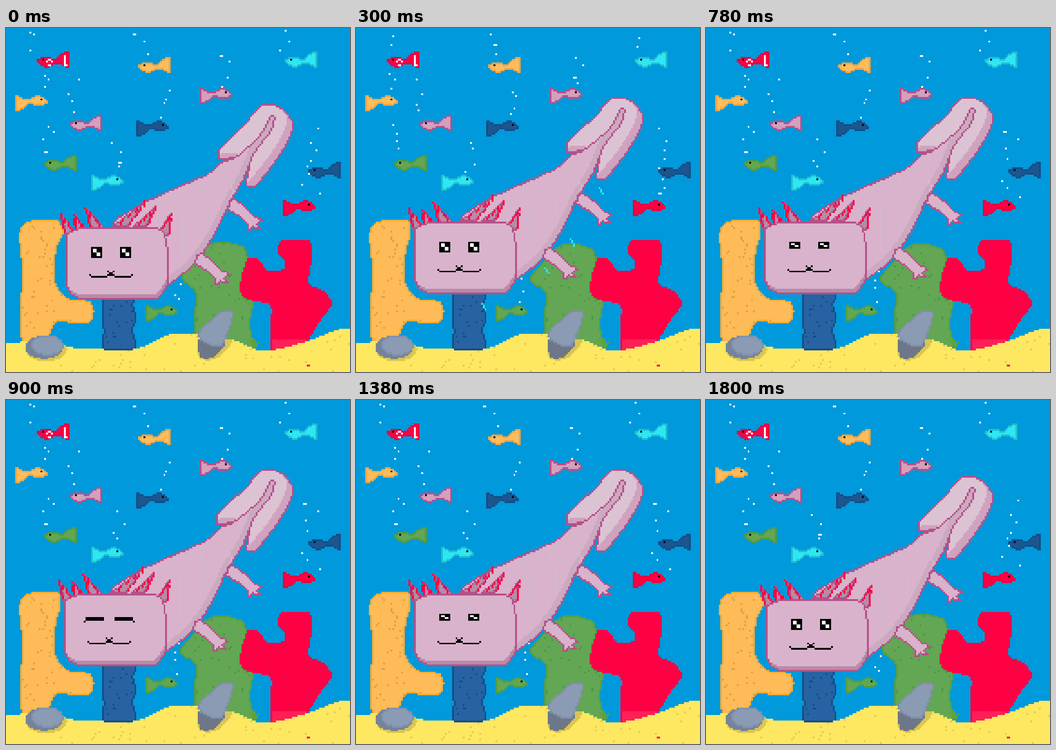
An HTML page with a canvas that plays this animation: 748 px wide and 748 px high, repeating every 2100 ms.

```html
<!DOCTYPE html>
<html lang="en">
<head>
<meta charset="utf-8">
<title>Axolotl aquarium</title>
<style>
html, body { margin: 0; width: 100%; height: 100%; overflow: hidden; background: #0099db; }
canvas { display: block; width: 748px; height: 748px; image-rendering: pixelated; }
</style>
</head>
<body>
<canvas id="tank" width="190" height="190"></canvas>
<script>
const N = 190, CELL = 748 / N, STEP = 300;
const C = {
  water: '#0099db', sand: '#fee761', grain: '#e4cb50', shade: '#dbc552',
  red: '#ff0044', cyan: '#2ce8f5', line: '#b55088', skin: '#d9b3cb',
  fin: '#dcc3d3', finDark: '#cfa3bf', belly: '#cbaac1', dark: '#b78ba7', rib: '#d4b8cd'
};

const pts = s => s.split(' ').map(p => p.split(',').map(Number));
const still = (x, y) => [x, y];
const lift = (x, y) => [x - (x < 505 ? CELL : 0), y - (x > 455 && y < 350 ? 4 : 3) * CELL];
const noise = (x, y) => {
  const v = Math.sin(x * 12.9898 + y * 78.233) * 43758.5453;
  return v - Math.floor(v);
};
const oval = (cx, cy, rx, ry) => Array.from({ length: 16 }, (_, i) => {
  const a = i * Math.PI / 8;
  return [cx + rx * Math.cos(a), cy + ry * Math.sin(a)];
});

let g;
function box(x, y, w, h, color) {
  g.fillStyle = color;
  g.fillRect(x, y, w, h);
}

// Closed spline through the points; bend 0 gives straight sides
function outline(p, bend) {
  const path = new Path2D(), at = i => p[(i + p.length) % p.length];
  path.moveTo(...p[0]);
  p.forEach((a, i) => {
    const z = at(i - 1), b = at(i + 1), c = at(i + 2);
    path.bezierCurveTo(
      a[0] + (b[0] - z[0]) * bend, a[1] + (b[1] - z[1]) * bend,
      b[0] - (c[0] - a[0]) * bend, b[1] - (c[1] - a[1]) * bend, ...b);
  });
  path.closePath();
  return path;
}

// Hard-edged shape: one-cell border, shaded rim towards `rim`, random specks
function shape(points, fill, opt = {}) {
  const { edge, move = still, bend = .1, rim, tint, speck, density = 0 } = opt;
  const p = points.map(q => move(...q).map(v => v / CELL));
  const path = outline(p, bend), mask = new Set(), key = (x, y) => y * 1000 + x;
  const range = k => [Math.min(...p.map(q => q[k])) - 2, Math.max(...p.map(q => q[k])) + 2].map(Math.round);
  const [x0, x1] = range(0), [y0, y1] = range(1);
  const each = fn => {
    for (let y = y0; y <= y1; y++) for (let x = x0; x <= x1; x++) fn(x, y);
  };
  const has = (x, y) => mask.has(key(x, y));
  g.lineWidth = 1;
  each((x, y) => {
    if (g.isPointInPath(path, x + .5, y + .5) || g.isPointInStroke(path, x + .5, y + .5)) mask.add(key(x, y));
  });
  each((x, y) => {
    if (!has(x, y)) return;
    let color = noise(x, y) < density ? speck : fill;
    if (rim && !has(x + rim[0], y + rim[1])) color = tint;
    if (edge && !(has(x - 1, y) && has(x + 1, y) && has(x, y - 1) && has(x, y + 1))) color = edge;
    box(x, y, 1, 1, color);
  });
}

function stroke(points, color, move = still) {
  const p = points.map(q => move(...q).map(v => Math.floor(v / CELL)));
  for (let i = 1; i < p.length; i++) {
    const [ax, ay] = p[i - 1], [bx, by] = p[i];
    const n = Math.max(Math.abs(bx - ax), Math.abs(by - ay), 1);
    for (let k = 0; k <= n; k++) {
      box(Math.round(ax + (bx - ax) * k / n), Math.round(ay + (by - ay) * k / n), 1, 1, color);
    }
  }
}

// Fish: cell position, ink, facing right
const FISH = [
  [17, 13, 'red'], [73, 16, 'orange'], [154, 13, 'cyan'],
  [35, 48, 'pink'], [21, 70, 'green'], [167, 74, 'navy'],
  [5, 37, 'orange', 1], [107, 33, 'pink', 1], [72, 51, 'navy', 1],
  [47, 81, 'cyan', 1], [153, 95, 'red', 1], [77, 153, 'green', 1]
];
const INK = {
  red: ['#ff0044', '#e4063f'], orange: ['#febc5c', '#efa644'], cyan: ['#2ce8f5', '#24becb'],
  pink: ['#d3a0be', '#b55088'], navy: ['#1c568f', '#124e89'], green: ['#63a653', '#519c42']
};
const FORM = pts('.5,5.5 2.5,3.7 5,3.4 8,3.9 10.5,5 13.5,2 16,.6 17.4,.5 17.4,8 14.5,7.4 12.5,6.4 10.5,6 8,7.8 5,8.2 2.5,7.3');

function fish([x, y, ink, right]) {
  const [fill, edge] = INK[ink];
  const form = FORM.map(([a, b]) => (right ? [x + 18 - a, y + 9 - b] : [x + a, y + b]).map(v => v * CELL));
  shape(form, fill, { edge });
  box(x + (right ? 14 : 3), y + (right ? 2 : 4), 1, 1, '#000');
}

function stripes() {
  for (let a = 0; a < 6; a++) {
    box(Math.round(23.5 + 1.8 * Math.cos(a * Math.PI / 3)), Math.round(18.4 + 1.8 * Math.sin(a * Math.PI / 3)), 1, 1, '#fff');
  }
  box(32, 15, 1, 6, '#fff');
  box(33, 20, 1, 1, '#fff');
}

// A loose column of bubbles over each mouth; deep fish follow the swimmer's pose
function bubbles(up, burst) {
  FISH.forEach(([x, y, , right], i) => {
    const seed = i + (burst ? 40 : up && y > 73 ? 20 : 0);
    const mouth = x + (right ? 15 : 1);
    for (let k = 0; k < 4; k++) {
      const dx = Math.round((noise(seed, k) - .5) * (burst ? 6 : 10));
      const rise = 1 + k * 5 + Math.round(noise(k, seed) * 4);
      box(mouth + dx, y - rise, noise(seed, k + 9) < .12 ? 2 : 1, 1, '#fff');
    }
  });
}

function reef(up) {
  const sway = (x, y) => up && y < 560 ? [x - 3, y + 4] : [x, y];
  const slim = (x, y) => up && x > 115 && y < 475 ? [x - 5, y] : [x, y];
  shape(pts('50,422 110,419 123,445 108,480 104,550 130,588 180,596 189,616 178,639 110,638 94,665 94,700 40,700 34,625 37,520 31,465 33,440'),
    '#febb58', { edge: '#feae34', move: slim, speck: '#e2a03c', density: .03 });

  const left = [], right = [];
  for (let y = 570; y <= 700; y += 10) {
    const wave = Math.cos((y - 575) / 55 * 2 * Math.PI);
    left.unshift([210 + (y - 570) * .02 - wave, y]);
    right.push([280 - (y - 570) * .03 + 4 * wave, y]);
  }
  shape([...right, ...left], '#2763a2', { edge: '#124e89', speck: '#124e89', density: .04 });

  shape(pts('386,535 440,474 480,467 516,478 526,510 520,560 537,598 529,645 534,696 420,700 410,650 414,600 412,570 389,552'),
    '#63a653', { edge: '#559f45', move: sway, speck: '#519548', density: .025 });
  shape(pts('598,465 630,462 660,463 662,510 657,556 690,574 707,600 680,637 650,688 620,701 578,701 578,604 545,593 513,580 513,540 527,503 546,502 570,530 607,525 606,504 593,488'),
    C.red, { speck: '#e2103f', density: .015 });
  shape(pts('580,680 653,680 644,703 580,703'), '#ff1f58', { bend: 0 });
}

function seabed() {
  shape(pts('-10,694 45,684 110,685 130,694 170,699 275,701 320,685 350,670 420,667 495,681 545,701 580,702 660,682 700,666 748,656 760,760 -10,760'),
    C.sand, { speck: C.grain, density: .016 });
  shape(oval(88, 700, 42, 23), C.shade);
  shape(oval(83, 694, 39, 23), '#75839a');
  shape(oval(90, 690, 33, 20), '#8b9bb4', { edge: '#8292ac' });
  shape(pts('423,690 490,680 468,708 446,720 424,718'), C.shade);
  shape(pts('423,676 474,686 462,703 443,716 423,714'), '#6d7788');
  shape(pts('424,656 470,617 490,617 492,632 471,688 450,691 423,677'), '#8b9bb4', { edge: '#7f8fa8' });
  for (let k = 0; k < 5; k++) stroke([[542, 696], [531 + k * 5, 676 + 10 * noise(k, 3)]], '#5fa23c');
  box(166, 186, 2, 1, C.red);
}

const LEG = pts('0,0 11,-5 38,18 52,35 66,37 69,43 56,46 64,57 57,59 50,53 45,64 38,62 40,50 22,33 -4,16');

function body(move) {
  const edge = C.line;
  shape(pts('464,286 465,264 520,208 558,169 592,171 625,207 608,255 570,310 540,343 522,340 530,290 500,281'),
    C.fin, { edge, move, rim: [4, 3], tint: C.finDark });
  shape(pts('232,432 290,386 350,357 440,317 470,293 500,281 550,238 575,195 584,194 575,225 540,270 516,328 484,384 447,458 410,510 354,556 300,540'),
    C.skin, { edge, move, rim: [3, 3], tint: C.belly });
  for (let k = 0; k < 3; k++) {
    const x = 370 + 54 * k, y = 364 - 27 * k;
    stroke([[x, y], [x + 15, y + 45], [x + 14, y + 130 - 38 * k]], C.rib, move);
  }
  [[487, 377], [416, 495]].forEach(([x, y]) =>
    shape(LEG.map(([a, b]) => [x + a, y + b]), C.skin, { edge, move, bend: 0 }));
}

// Gills: tip, then the two ends and the height of the base
const GILLS = [
  [122, 408, 129, 152, 446], [152, 410, 150, 175, 437], [176, 394, 186, 212, 434],
  [300, 380, 232, 262, 433], [323, 390, 278, 304, 433], [356, 408, 328, 354, 452]
];
function gills(move) {
  GILLS.forEach(([x, y, b0, b1, by]) => {
    shape([[x, y], [b1, by], [b0, by]], C.dark, { edge: C.line, move, bend: 0 });
    const lean = Math.sign(x - (b0 + b1) / 2);
    [b0, b1].forEach(b => {
      for (let t = 0; t < .8; t += .25) {
        const px = x + (b - x) * t, py = y + (by - y) * t;
        stroke([[px, py + 6], [px + lean * 3, py - 3]], C.red, move);
      }
    });
  });
}

function head(move) {
  shape(pts('133,452 150,438 180,436 325,436 342,444 350,475 352,500 352,555 328,587 160,587 142,577 133,560'),
    C.skin, { edge: C.line, move, bend: .04, rim: [1, 3], tint: C.dark });
}

function face(up, eyes) {
  const ox = up ? -1 : 0, oy = up ? -3 : 0;
  const dab = (x, y, w, h, color = '#000') => box(x + ox, y + oy, w, h, color);
  const both = (x, y, w, h) => [x, 116 - x - w].forEach(v => dab(v, y, w, h));
  if (eyes === 'shut') {
    both(45, 123, 10, 2);
    both(44, 125, 1, 1);
  } else {
    const h = eyes === 'half' ? 1 : 2;
    [47, 63].forEach(x => {
      dab(x, 121, 6, 2 + 2 * h);
      dab(x + 1, 122, 2, h, '#fff');
      dab(x + 3, 122 + h, 2, h, '#fff');
    });
  }
  both(46, 136, 1, 1);
  both(47, 137, 9, 1);
  both(56, 134, 1, 1);
  both(57, 135, 1, 1);
  both(56, 136, 2, 1);
}

// Short streaks of moving water
const RISE = { from: pts('529,348 466,459 411,520 273,600'), by: [8, 14] };
const SINK = { from: pts('470,199 407,286 301,337 210,388'), by: [22, 17] };
const swirl = ({ from, by }) => from.forEach(([x, y]) => stroke([[x, y], [x + by[0], y + by[1]]], C.cyan));

const rest = {};
const drowsy = { up: true, eyes: 'half' };
const STEPS = [
  rest,
  { up: true, burst: true, swish: RISE },
  drowsy,
  { up: true, eyes: 'shut' },
  drowsy,
  { swish: SINK },
  rest
];

function paint({ up = false, eyes = 'open', burst = false, swish }) {
  const sheet = document.createElement('canvas');
  sheet.width = sheet.height = N;
  g = sheet.getContext('2d');
  const move = up ? lift : still;
  box(0, 0, N, N, C.water);
  reef(up);
  seabed();
  bubbles(up, burst);
  FISH.forEach(fish);
  stripes();
  body(move);
  gills(move);
  head(move);
  face(up, eyes);
  if (swish) swirl(swish);
  return sheet;
}

const sheets = STEPS.map(paint);
const tank = document.getElementById('tank').getContext('2d');
function tick() {
  const i = Math.floor(performance.now() / STEP) % STEPS.length;
  tank.drawImage(sheets[i], 0, 0);
  requestAnimationFrame(tick);
}
tick();
</script>
</body>
</html>
```
